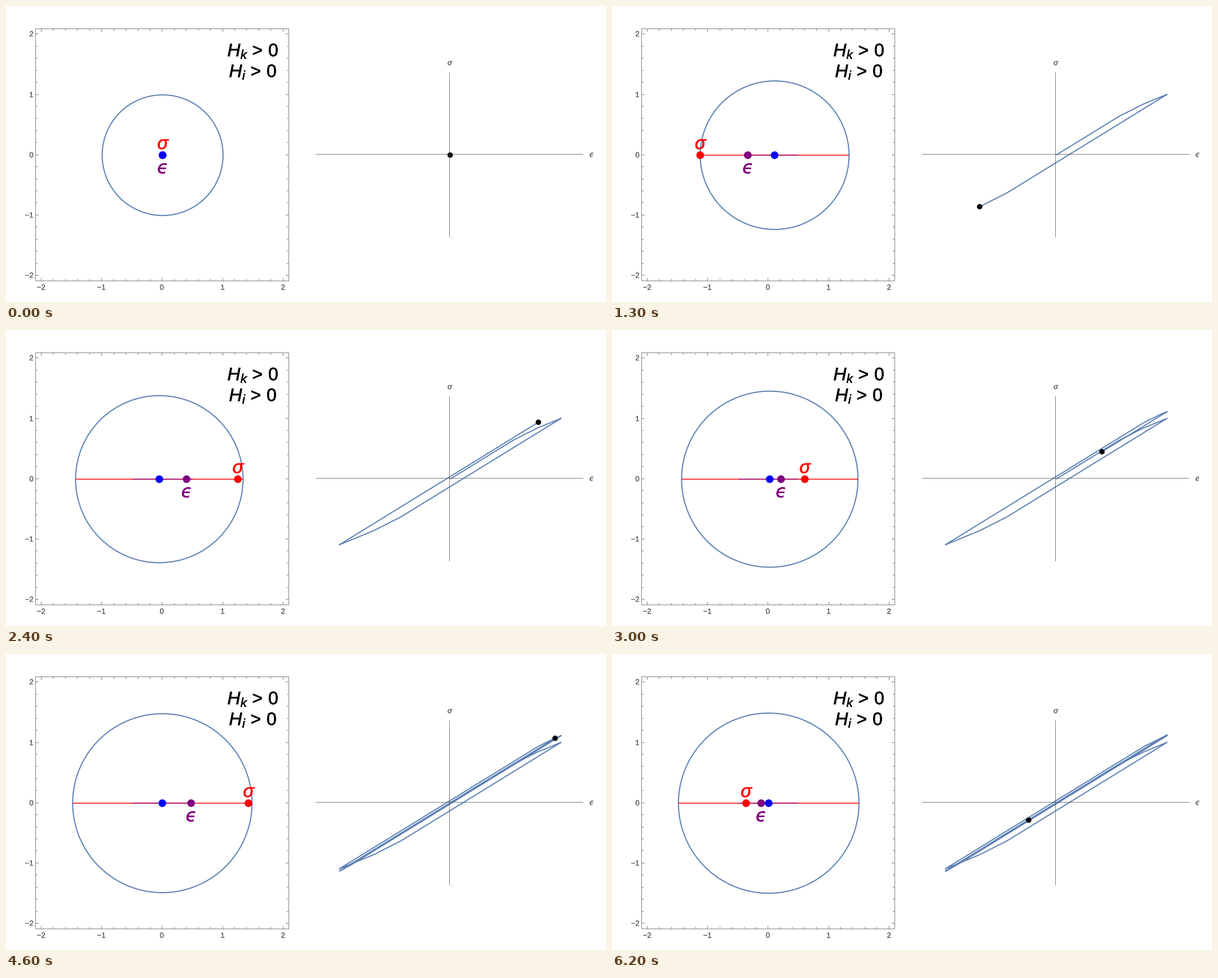
A matplotlib script that plays this animation: 1064 by 526 pixels, repeating every 6.3 s.

```python
import numpy as np
import matplotlib.pyplot as plt
from matplotlib.animation import FuncAnimation
from matplotlib.patches import Circle, Rectangle
from matplotlib.patheffects import withStroke

W, H, DPI = 1064, 526, 64
FRAMES, INTERVAL = 63, 100
PT = 72 / DPI  # points per pixel

BLUE = (0.368, 0.507, 0.71)
GRAY, LABEL = "#7f7f7f", "#606060"
AXIS = (0.25, 0.25, 0.25, 0.68)
SANS, GREEK = "Liberation Sans", "DejaVu Sans"

# Material: elastic modulus, kinematic and isotropic hardening, yield stress
E, H_KIN, H_ISO, YIELD = 3.0, 3.0, 3.0, 1.0

# Left plot (stress space) and right plot (stress against strain), in pixels
LX, LY, UNIT = 277.7, 265.1, 107.2
RX, RY, STRAIN_PX, STRESS_PX = 787.6, 264.9, 394.5, 81.1


def simulate(strain):
    """Return mapping for 1D plasticity with mixed hardening."""
    stress = back = 0.0
    radius = YIELD
    rows = [(stress, back, radius)]
    for step in np.diff(strain):
        stress += E * step
        excess = abs(stress - back) - radius
        if excess > 0:
            sign = np.sign(stress - back)
            flow = excess / (E + H_KIN + H_ISO)
            stress -= sign * E * flow
            back += sign * H_KIN * flow
            radius += H_ISO * flow
        rows.append((stress, back, radius))
    return np.array(rows).T


strain = 0.5 * np.sin(0.3 * np.arange(FRAMES))
stress, back, radius = simulate(strain)

fig = plt.figure(figsize=(W / DPI, H / DPI), dpi=DPI, facecolor="white")
ax = fig.add_axes([0, 0, 1, 1])
ax.set_xlim(0, W)
ax.set_ylim(H, 0)
ax.axis("off")


def line(xs, ys, color, width, z):
    return ax.plot(xs, ys, color=color, lw=width * PT, zorder=z, snap=False,
                   solid_capstyle="butt")[0]


def label(x, y, s, size, color="black", ha="left", italic=False, font=SANS):
    # A thin outline gives the slightly heavy look of smoothed type.
    outline = withStroke(linewidth=0.02 * size * PT, foreground=color)
    return ax.text(x, y, s, fontsize=size * PT, color=color, ha=ha,
                   va="baseline", family=font, zorder=8,
                   style="italic" if italic else "normal",
                   path_effects=[outline])


def dot(color, r, z):
    return ax.add_patch(Circle((0, 0), r, fc=color, ec="none", zorder=z))


def pixel_center(v):
    return np.floor(v) + 0.5


def draw_frame():
    x0, x1, y0, y1 = 52.5, 501.5, 40.5, 488.5
    ax.add_patch(Rectangle((x0, y0), x1 - x0, y1 - y0, fill=False,
                           ec=GRAY, lw=PT, zorder=1, snap=False))
    for i in range(-10, 11):
        size = 5.5 if i % 5 == 0 else 3.5
        x = pixel_center(276.9 + i * UNIT / 5)
        y = pixel_center(264.2 - i * UNIT / 5)
        for edge, inward in ((y0, size), (y1, -size)):
            line([x, x], [edge, edge + inward], GRAY, 1, 1)
        for edge, inward in ((x0, size), (x1, -size)):
            line([edge, edge + inward], [y, y], GRAY, 1, 1)
        if i % 5 == 0:
            text = str(i // 5).replace("-", "\u2212")
            label(x - 0.3, 504.2, text, 13.3, LABEL, "center")
            label(48.7, y + 4.5, text, 13.3, LABEL, "right")


def draw_condition(x, y, index, gap):
    label(x, y, "H", 32, italic=True)
    label(x + 23.3, y + 4.8, index, 22.7, italic=True)
    label(x + gap, y, ">", 32)
    label(x + gap + 28.5, y, "0", 32)


draw_frame()
draw_condition(392.5, 89.2, "k", 44)
draw_condition(395.5, 126.2, "i", 38)

line([550, 1023.5], [263.5, 263.5], AXIS, 1, 7)
line([786.5, 786.5], [118, 411], AXIS, 1, 7)
label(787, 105, "\u03c3", 13.3, LABEL, "center", True)
label(1038.5, 268, "\u03f5", 13, LABEL, "center", True, GREEK)

surface = ax.add_patch(Circle((LX, LY), UNIT, fill=False, ec=BLUE,
                              lw=2 * PT, zorder=2))
stress_span = line([], [], "red", 1.5, 3)
strain_span = line([], [], "purple", 1.2, 4)
stress_dot = dot("red", 6.8, 5)
strain_dot = dot("purple", 6.8, 5.1)
back_dot = dot("blue", 6.8, 5.2)
sigma = label(LX, 254.1, "\u03c3", 32.5, "red", "center", True)
epsilon = label(LX, 297.2, "\u03f5", 31.5, "purple", "center", True, GREEK)

curve = line([], [], BLUE, 2, 3)
curve.set_solid_joinstyle("round")
state_dot = dot("black", 4.8, 5)


def show_span(artist, values):
    ends = LX + UNIT * np.array([values.min(), values.max()])
    artist.set_data(ends, [LY, LY])


def update(n):
    past = slice(0, n + 1)
    xs, xe, xb = (LX + UNIT * v[n] for v in (stress, strain, back))

    surface.set_center((xb, LY))
    surface.set_radius(UNIT * radius[n])
    show_span(stress_span, stress[past])
    show_span(strain_span, strain[past])
    for marker, x in ((stress_dot, xs), (strain_dot, xe), (back_dot, xb)):
        marker.set_center((x, LY))
    sigma.set_x(xs + 0.3)
    epsilon.set_x(xe + 0.1)

    px = RX + STRAIN_PX * strain[past]
    py = RY - STRESS_PX * stress[past]
    curve.set_data(px, py)
    state_dot.set_center((px[-1], py[-1]))
    return (surface, stress_span, strain_span, stress_dot, strain_dot,
            back_dot, sigma, epsilon, curve, state_dot)


anim = FuncAnimation(fig, update, frames=FRAMES, interval=INTERVAL,
                     repeat=True, blit=False)
plt.show()
```
